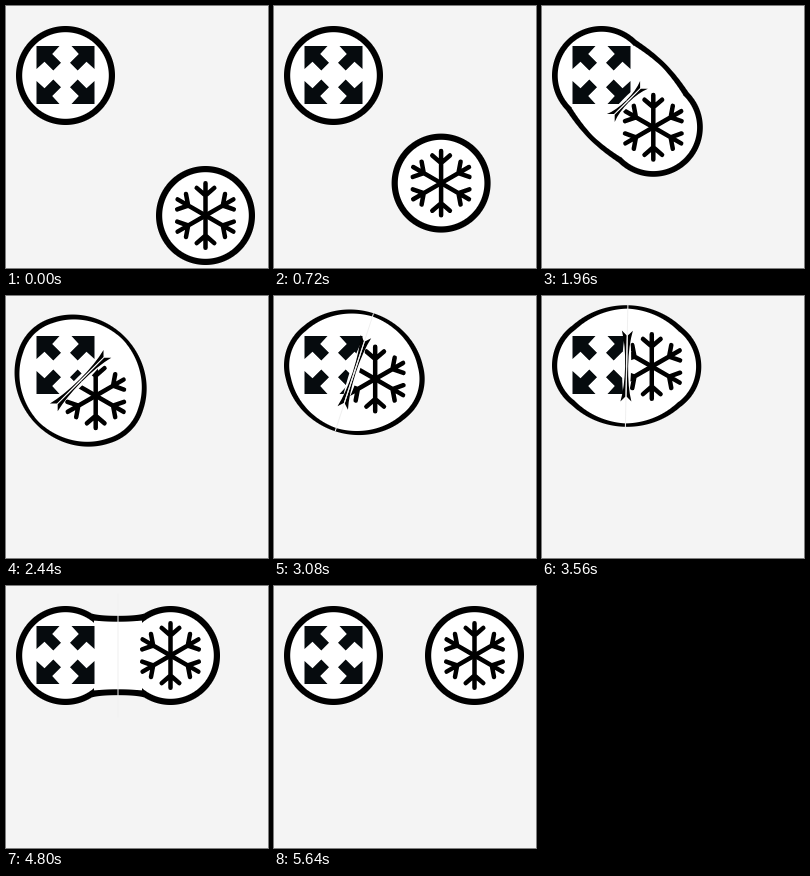
These frames come from a looping animation (262 by 262 pixels, 5680 ms). An HTML page with a canvas:

```html
<!DOCTYPE html>
<html lang="en">
<head>
<meta charset="utf-8">
<title>Merging icons</title>
<style>
  html, body { margin: 0; width: 100%; height: 100%; overflow: hidden; background: #f4f4f4; }
  canvas { display: block; width: 262px; height: 262px; }
</style>
</head>
<body>
<canvas id="stage" width="262" height="262"></canvas>
<script>
const SIZE = 262, LOOP = 5680, STEP = 40;
const RADIUS = 49.5, RING = 6.2, REACH = 40, BACK = 244;
const HOME = { x: 59.5, y: 69.5 };
// Corners of the path: time, x, y
const PATH = [[0, 199.5, 209.5], [2440, 89.7, 99.7], [3600, 110.5, 69.5], [5600, 200.5, 69.5]];

const ctx = document.getElementById('stage').getContext('2d');
const image = ctx.createImageData(SIZE, SIZE);
const pixels = new Uint32Array(image.data.buffer);
const clamp = v => Math.max(0, Math.min(1, v));

function moverAt(t) {
  let i = 0;
  while (i < PATH.length - 2 && t > PATH[i + 1][0]) i++;
  const [t0, x0, y0] = PATH[i], [t1, x1, y1] = PATH[i + 1];
  const p = clamp((t - t0) / (t1 - t0));
  return { x: x0 + (x1 - x0) * p, y: y0 + (y1 - y0) * p };
}

// Two discs that swell into each other, with a black rim that thins as they overlap
function drawBlob(b, dist, swell) {
  const power = REACH / (2 * swell);
  const thin = clamp((95 - dist) / 45);
  for (let y = 0, i = 0; y < SIZE; y++) {
    for (let x = 0; x < SIZE; x++, i++) {
      const ax = x + 0.5 - HOME.x, ay = y + 0.5 - HOME.y;
      const bx = x + 0.5 - b.x, by = y + 0.5 - b.y;
      const ra = Math.hypot(ax, ay), rb = Math.hypot(bx, by);
      const near = clamp(1 - Math.abs(ra - rb) / REACH);
      const field = Math.min(ra, rb) - RADIUS - swell * Math.pow(near, power);

      // Divide by the slope so the rim width is in pixels
      const w = near > 0 ? 0.5 * Math.pow(near, power - 1) : 0;
      const cos = (ax * bx + ay * by) / (ra * rb + 1e-6);
      const slope = Math.sqrt(Math.max(0.01, 1 - 2 * w * (1 - w) * (1 - cos)));
      const d = field / slope;

      const outer = clamp(0.5 - d);
      const inner = clamp(0.5 - d - RING + thin * (1 + 1.8 * near));
      const v = Math.round(BACK * (1 - outer) + 255 * inner);
      pixels[i] = (255 << 24 | v << 16 | v << 8 | v) >>> 0;
    }
  }
  ctx.putImageData(image, 0, 0);
}

function drawArrows() {
  const arrow = [[29, 29], [6, 29], [13.3, 21], [4.5, 12.2], [12.2, 4.5], [21, 13.3], [29, 6]];
  ctx.fillStyle = '#060b0e';
  ctx.beginPath();
  for (const sx of [-1, 1]) for (const sy of [-1, 1]) {
    arrow.forEach(([x, y], i) => ctx[i ? 'lineTo' : 'moveTo'](x * sx, y * sy - 0.5));
    ctx.closePath();
  }
  ctx.fill();
}

function drawFlake() {
  ctx.strokeStyle = '#000';
  ctx.lineWidth = 4.5;
  ctx.lineCap = ctx.lineJoin = 'round';
  for (let i = 0; i < 6; i++) {
    ctx.beginPath();
    ctx.moveTo(0, 0);
    ctx.lineTo(0, -32.2);
    ctx.moveTo(-8.8, -27.6);
    ctx.lineTo(0, -20);
    ctx.lineTo(8.8, -27.6);
    ctx.stroke();
    ctx.rotate(Math.PI / 3);
  }
}

// Draws an icon on its own side of the seam
function drawHalf(center, mid, angle, side, icon) {
  ctx.save();
  ctx.translate(mid.x, mid.y);
  ctx.rotate(angle);
  ctx.beginPath();
  ctx.rect(side < 0 ? -SIZE : 0, -SIZE, SIZE, SIZE * 2);
  ctx.clip();
  ctx.rotate(-angle);
  ctx.translate(center.x - mid.x, center.y - mid.y);
  icon();
  ctx.restore();
}

// Pinched slivers along the seam where the discs overlap
function drawSeam(mid, angle, dist, showLine) {
  const half = Math.sqrt(Math.max(0, 43.5 ** 2 - dist * dist / 4));
  ctx.save();
  ctx.translate(mid.x, mid.y);
  ctx.rotate(angle);
  if (half > 2) {
    ctx.fillStyle = '#fff';
    ctx.beginPath();
    ctx.ellipse(0, 0, 4.5, half, 0, 0, Math.PI * 2);
    ctx.fill();
    ctx.fillStyle = '#000';
    for (const sx of [-1, 1]) for (const sy of [-1, 1]) {
      ctx.beginPath();
      ctx.moveTo(sx * 0.5, sy * (half - 5));
      ctx.lineTo(sx * 5.5, sy * half);
      ctx.quadraticCurveTo(sx * 1.6, sy * half * 0.6, sx * 1.5, 0);
      ctx.lineTo(sx * 0.7, 0);
      ctx.fill();
    }
  }
  if (showLine) {
    ctx.fillStyle = '#f0f0f0';
    ctx.fillRect(-0.5, -62, 1, 124);
  }
  ctx.restore();
}

function draw(t) {
  const b = moverAt(t);
  const dx = b.x - HOME.x, dy = b.y - HOME.y;
  const dist = Math.hypot(dx, dy), angle = Math.atan2(dy, dx);
  const mid = { x: (HOME.x + b.x) / 2, y: (HOME.y + b.y) / 2 };
  const approaching = t <= PATH[1][0];
  const swell = 16.3 - (approaching ? 1.8 * clamp((dist - 45) / 55) : 0);

  drawBlob(b, dist, swell);
  drawHalf(HOME, mid, angle, -1, drawArrows);
  drawHalf(b, mid, angle, 1, drawFlake);
  drawSeam(mid, angle, dist, !approaching && dist < 2 * (RADIUS + swell));
}

const start = performance.now();
let last = -1;
function tick() {
  const t = Math.floor((performance.now() - start) % LOOP / STEP) * STEP;
  if (t !== last) draw(last = t);
  requestAnimationFrame(tick);
}
tick();
</script>
</body>
</html>
```
